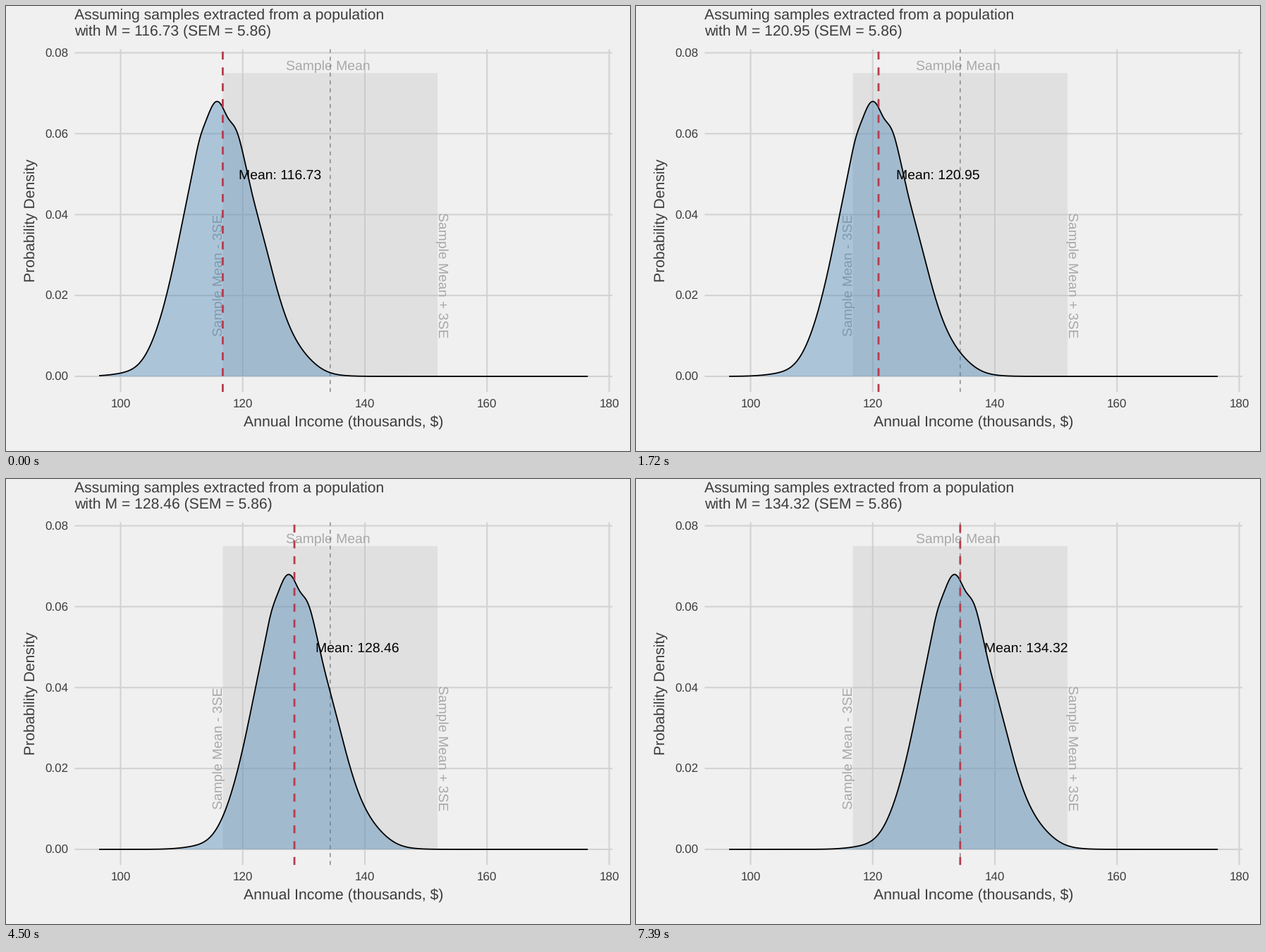
Write a matplotlib script that moves like this. It is 885 by 632 pixels and loops after 8 s.

```python
import numpy as np
import matplotlib.pyplot as plt
from matplotlib.animation import FuncAnimation
from matplotlib.patches import Polygon, Rectangle

W, H, DPI = 885, 632, 100
PT = 72 / DPI                      # points per pixel
LOOP, INTERVAL = 8000, 32
STEP = LOOP / 72                   # time between motion steps
START, CYCLE, MOVE = 500, 26, 10   # first move (ms), steps per state, steps per move

MEANS = [116.73, 120.95, 128.46, 134.32]
SEM = 5.86
SAMPLE = MEANS[-1]

BG, GRID, INK, MUTED = "#F0F0F0", "#D2D2D2", "#3C3C3C", "#A9A9A9"
LEFT, RIGHT, TOP, BOTTOM = 97.5, 860, 61.6, 548.1

plt.rcParams.update({
    "font.family": "Liberation Sans",
    "text.hinting": "none",
    "path.snap": False,
    "lines.dash_capstyle": "butt",
    "lines.solid_capstyle": "butt",
})


def px(income):
    return 162.5 + (income - 100) * 8.6625


def py(density):
    return 526 - density * 5744


def gauss(d, center, height, width):
    return height * np.exp(-((d - center) / width) ** 2 / 2)


# Sampling wobble on top of the normal curve: center, height, width
WOBBLE = [
    (-13, -1.3e-3, 2.3), (-5.2, 2.6e-3, 2.4), (-3.8, 1.2e-3, 0.7),
    (-1.5, 0.8e-3, 0.9), (0.9, -3.3e-3, 0.9), (4.4, -3.6e-3, 1.6),
    (13.5, 0.9e-3, 2.2),
]


def density(d):
    """Normal density with the sampling error SEM, plus its wobble."""
    peak = 1 / (SEM * np.sqrt(2 * np.pi))
    return gauss(d, 0, peak, SEM) + sum(gauss(d, *w) for w in WOBBLE)


incomes = np.linspace(96.48, 176.5, 512)
curves = [density(incomes - m) for m in MEANS]

fig = plt.figure(figsize=(W / DPI, H / DPI), dpi=DPI, facecolor=BG)
ax = fig.add_axes([0, 0, 1, 1])
ax.set(xlim=(0, W), ylim=(H, 0))
ax.axis("off")


def line(xs, ys, color, width, z, **kw):
    return ax.plot(xs, ys, color=color, lw=width * PT, zorder=z, **kw)[0]


def label(x, y, text, size, color=INK, ha="center", rotation=0, z=3):
    return ax.text(x, y, text, fontsize=size * PT, color=color, ha=ha,
                   va="baseline", rotation=rotation,
                   rotation_mode="anchor", zorder=z)


# Grid and axes
for v in range(100, 181, 20):
    line([px(v)] * 2, [TOP, BOTTOM], GRID, 2.07, 1)
    label(px(v), 570.7, str(v), 17.07)
for v in np.arange(0, 0.081, 0.02):
    line([LEFT, RIGHT], [py(v)] * 2, GRID, 2.07, 1)
    label(88.3, py(v) + 6.2, f"{v:.2f}", 17.07, ha="right")
label(478.6, 596.3, "Annual Income (thousands, $)", 21.25)
label(41, 304.9, "Probability Density", 21.2, rotation=90)
label(97.3, 18.9, "Assuming samples extracted from a population", 21.2, ha="left")
title = label(97.3, 41.2, "", 21.2, ha="left")

# Band of three standard errors around the sample mean
lo, hi = px(SAMPLE - 3 * SEM), px(SAMPLE + 3 * SEM)
ax.add_patch(Rectangle((lo, py(0.075)), hi - lo, py(0) - py(0.075),
                       fc="#BEBEBE", alpha=0.3, lw=0, zorder=2))
label(457.2, 90.6, "Sample Mean", 19.35, MUTED)
label(307, py(0.025), "Sample Mean - 3SE", 19.35, MUTED, rotation=90)
label(612.7, py(0.025), "Sample Mean + 3SE", 19.35, MUTED, rotation=270)
line([px(SAMPLE)] * 2, [BOTTOM, TOP], "#7F7F7F", 1.4, 4, ls=(0, (4, 4)))

# Moving parts
area = Polygon([(0, 0), (1, 1), (1, 0)], fc="#4682B4", alpha=0.4, lw=0, zorder=5)
ax.add_patch(area)
outline = line([], [], "black", 1.8, 6)
marker = line([], [], "#B63C4F", 2.81, 7, ls=(0, (4, 4)))
note = label(0, py(0.05) + 7, "", 19.35, "black", z=8)


def pose(t):
    """State index and progress of the move to the next state."""
    n = int(np.floor((t - START) / STEP))
    if n < 0:
        return 0, 0.0
    return n // CYCLE, min(1.0, (n % CYCLE + 1) / MOVE)


def draw(i):
    s, f = pose((i + 1) * INTERVAL)
    a, b = MEANS[s], MEANS[s + 1]
    mean = a + (b - a) * f
    xs = px(incomes)
    ys = py(curves[s] * (1 - f) + curves[s + 1] * f)
    outline.set_data(xs, ys)
    area.set_xy([(xs[0], py(0)), *zip(xs, ys), (xs[-1], py(0))])
    marker.set_data([px(mean)] * 2, [BOTTOM, TOP])
    note.set_x(px(mean * 1.08))
    note.set_text(f"Mean: {b if f >= 0.5 else a:.2f}")
    title.set_text(f"with M = {b if f > 0.5 else a:.2f} (SEM = {SEM})")
    return area, outline, marker, note, title


anim = FuncAnimation(fig, draw, frames=LOOP // INTERVAL, interval=INTERVAL,
                     init_func=lambda: draw(0), repeat=True, repeat_delay=0)
plt.show()
```
